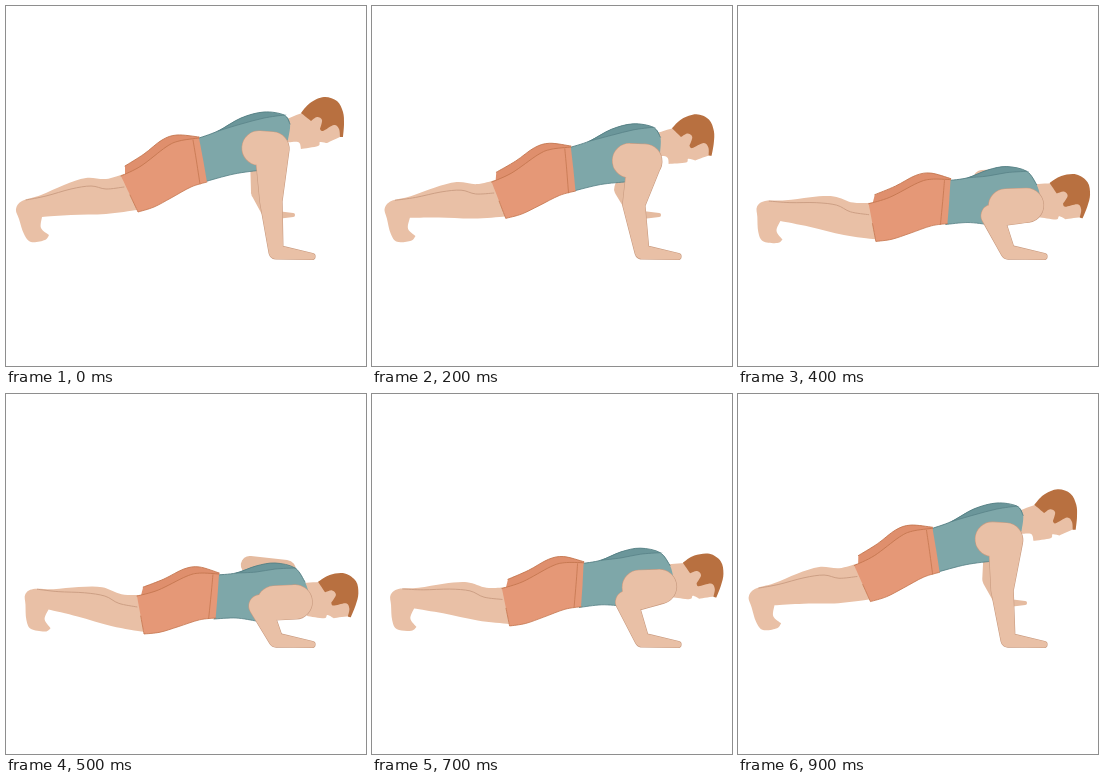
These frames come from a looping animation (360x360 px, 1 s). An HTML page:

```html
<!DOCTYPE html>
<html lang="en">
<head>
<meta charset="utf-8">
<title>Push-up</title>
<style>
html, body { margin: 0; width: 100%; height: 100%; overflow: hidden; background: #fff; }
svg { display: block; width: 100%; height: 100%; }
</style>
</head>
<body>
<svg id="stage" viewBox="0 0 360 360" fill="none" stroke-linecap="round" stroke-linejoin="round"></svg>
<script>
const stage = document.getElementById('stage');
const SKIN = '#e9c0a6', FAR_SKIN = '#e5bba0', CREASE = '#c99b80';
const SHORTS = '#e59877', FAR_SHORTS = '#df8f6d', SEAM = '#c57650';
const SHIRT = '#7ea7a9', FOLD = '#6b969a', SHADE = '#557f84', HAIR = '#b87040';

// Timing: one eased way down, a short rest, one eased way up.
const ease = (t, from, to) => {
  const x = Math.min(1, Math.max(0, (t - from) / (to - from)));
  return (1 - Math.cos(Math.PI * x)) / 2;
};
const depthAt = t => ease(t, 80, 500) - ease(t, 580, 952);

// A joint sinks in proportion to depth and swings forward on an arc.
const joint = (x, y, dx, dy) => depth => ({
  x: x + dx * Math.sin(depth * Math.PI / 2),
  y: y + dy * depth
});

const toe = joint(28, 236, 0, 0);
const hemTop = joint(115, 170, 16, 32);
const hemBottom = joint(132, 206, 6, 34);
const waist = joint(193, 132, 20, 48);
const nape = joint(296, 107, 17, 81);
const chest = joint(253, 142, 15, 67);
const shoulder = joint(266, 143, 23, 65);
const elbow = joint(265, 195, -11, 17);
const wrist = joint(270, 246, 0, 0);
const fingers = joint(306, 250.5, 0, 0);
const farShoulder = joint(254, 150, 26, 26);
const farElbow = joint(254, 186, -10, -15);
const farWrist = joint(262, 209, 0, 0);
const farFingers = joint(287, 209, 0, 0);

// Outlines at rest, as "x,y" points; a trailing "!" marks a corner.
const parse = text => text.split(' ').map(s => {
  const [x, y] = s.replace('!', '').split(',').map(Number);
  return { x, y, corner: s.endsWith('!') };
});
const leg = parse('118,168! 100,173 80,172 58,179 35,189 16,195 10,203 13,213 18,228 25,236 39,234 43,229! 35,222 36,211! 65,209 100,208 131,204!');
const calf = parse('20,194 40,190 65,183 85,180 100,183 118,181');
const farShorts = parse('119,168! 119,160! 138,148 156,134 171,129 193,131! 193,142! 130,170!');
const nearShorts = parse('115,170! 135,160 160,141 173,135 193,132! 197,153 201,176! 185,181 165,192 148,201 132,206! 124,189');
const band = parse('187,134 190,152 194,178');
const face = parse('276,115! 296,107 318,100 334,115 336,130! 321,137! 314,136 312,140 295,143! 292,136 277,137!');
const hair = parse('295,107! 304,97 318,91 331,95 337,106 338,118 337,131! 334,131! 333,123 328,119 317,125 314,123! 316,114 311,111 305,115!');
const shirt = [
  joint(190, 133, 20, 48), joint(212, 125, 18, 54), joint(235, 112, 15, 60),
  joint(258, 106, 11, 63), joint(278, 109, 11, 65), joint(284, 118, 15, 70),
  joint(282, 134, 21, 66), joint(256, 164, -6, 63), joint(228, 168, 2, 56),
  joint(198, 176, 10, 49)
];
const shirtCorners = [0, 6, 7, 9];

// Carries rest points along with a triangle of joints.
function follow(joints, depth) {
  const [o, a, b] = joints.map(j => j(0));
  const [q, r, s] = joints.map(j => j(depth));
  const ux = a.x - o.x, uy = a.y - o.y, vx = b.x - o.x, vy = b.y - o.y;
  const det = ux * vy - uy * vx;
  return pts => pts.map(p => {
    const dx = p.x - o.x, dy = p.y - o.y;
    const m = (dx * vy - dy * vx) / det, n = (ux * dy - uy * dx) / det;
    return {
      x: q.x + m * (r.x - q.x) + n * (s.x - q.x),
      y: q.y + m * (r.y - q.y) + n * (s.y - q.y),
      corner: p.corner
    };
  });
}

// Carries rest points with the head, which tips forward about the nape.
function nod(depth) {
  const rest = nape(0), now = nape(depth);
  const angle = 0.31 * Math.sin(depth * Math.PI / 2);
  const c = Math.cos(angle), s = Math.sin(angle);
  return pts => pts.map(p => {
    const dx = p.x - rest.x, dy = p.y - rest.y;
    return { x: now.x + dx * c - dy * s, y: now.y + dx * s + dy * c, corner: p.corner };
  });
}

const f = v => v.toFixed(2);

// Smooth curve through the points.
function curve(pts, closed = true) {
  const n = pts.length;
  const at = i => pts[closed ? (i + n) % n : Math.max(0, Math.min(n - 1, i))];
  let d = `M${f(pts[0].x)} ${f(pts[0].y)}`;
  for (let i = 0; i < (closed ? n : n - 1); i++) {
    const a = at(i), b = at(i + 1);
    const before = a.corner ? a : at(i - 1), after = b.corner ? b : at(i + 2);
    d += `C${f(a.x + (b.x - before.x) / 6)} ${f(a.y + (b.y - before.y) / 6)} ` +
         `${f(b.x - (after.x - a.x) / 6)} ${f(b.y - (after.y - a.y) / 6)} ${f(b.x)} ${f(b.y)}`;
  }
  return closed ? d + 'Z' : d;
}

// Tapered limb between two circles, the first at least as big.
function limb(a, ra, b, rb) {
  const dir = Math.atan2(b.y - a.y, b.x - a.x);
  const open = Math.acos((ra - rb) / Math.hypot(b.x - a.x, b.y - a.y));
  const on = (p, r, t) => `${f(p.x + r * Math.cos(t))} ${f(p.y + r * Math.sin(t))}`;
  return `M${on(a, ra, dir + open)}A${ra} ${ra} 0 1 1 ${on(a, ra, dir - open)}` +
         `L${on(b, rb, dir - open)}A${rb} ${rb} 0 0 1 ${on(b, rb, dir + open)}Z`;
}

function drawing() {
  let out = '';
  return {
    fill: (d, color) => out += `<path d="${d}" fill="${color}"/>`,
    line: (d, color, width = 0.9) => out += `<path d="${d}" stroke="${color}" stroke-width="${width}"/>`,
    show: () => stage.innerHTML = out
  };
}

function render(time) {
  const depth = depthAt(Math.floor(time % 1000 / 100) * 100);
  const { fill, line, show } = drawing();
  const at = j => j(depth);
  const onLeg = follow([toe, hemTop, hemBottom], depth);
  const onHips = follow([hemTop, hemBottom, waist], depth);
  const onHead = nod(depth);

  fill(limb(at(farShoulder), 10, at(farElbow), 9) +
       limb(at(farElbow), 9, at(farWrist), 5) +
       limb(at(farWrist), 5, at(farFingers), 2), FAR_SKIN);

  fill(curve(onLeg(leg)), SKIN);
  line(curve(onLeg(calf), false), CREASE);

  fill(curve(onHead(face)), SKIN);
  fill(curve(onHead(hair)), HAIR);

  const top = shirt.map((j, i) => ({ ...at(j), corner: shirtCorners.includes(i) }));
  const back = top.slice(1, 5);
  const inner = back.map((p, i) => ({ x: p.x, y: p.y + 7 * Math.sin(Math.PI * i / 3) }));
  fill(curve(top), SHIRT);
  fill(curve([...back, ...inner.reverse()]), FOLD);
  line(curve(inner, false), SHADE, 0.7);
  line(curve(top.slice(0, 6), false), SHADE);
  line(curve(top.slice(7), false), SHADE, 0.8);

  const near = onHips(nearShorts), far = onHips(farShorts);
  fill(curve(far), FAR_SHORTS);
  line(curve(far.slice(1, 6), false), SEAM);
  fill(curve(near), SHORTS);
  line(curve(near.slice(0, 5), false), SEAM);
  line(curve(near.slice(6), false), SEAM, 0.8);
  line(curve(onHips(band), false), SEAM, 0.8);

  const arm = limb(at(shoulder), 17, at(chest), 17) +
              limb(at(shoulder), 17, at(elbow), 11) +
              limb(at(elbow), 11, at(wrist), 7) +
              limb(at(wrist), 7, at(fingers), 3);
  line(arm, CREASE, 1.2);
  fill(arm, SKIN);
  show();
}

const start = performance.now();
function tick() {
  render(performance.now() - start);
  requestAnimationFrame(tick);
}
tick();
</script>
</body>
</html>
```
